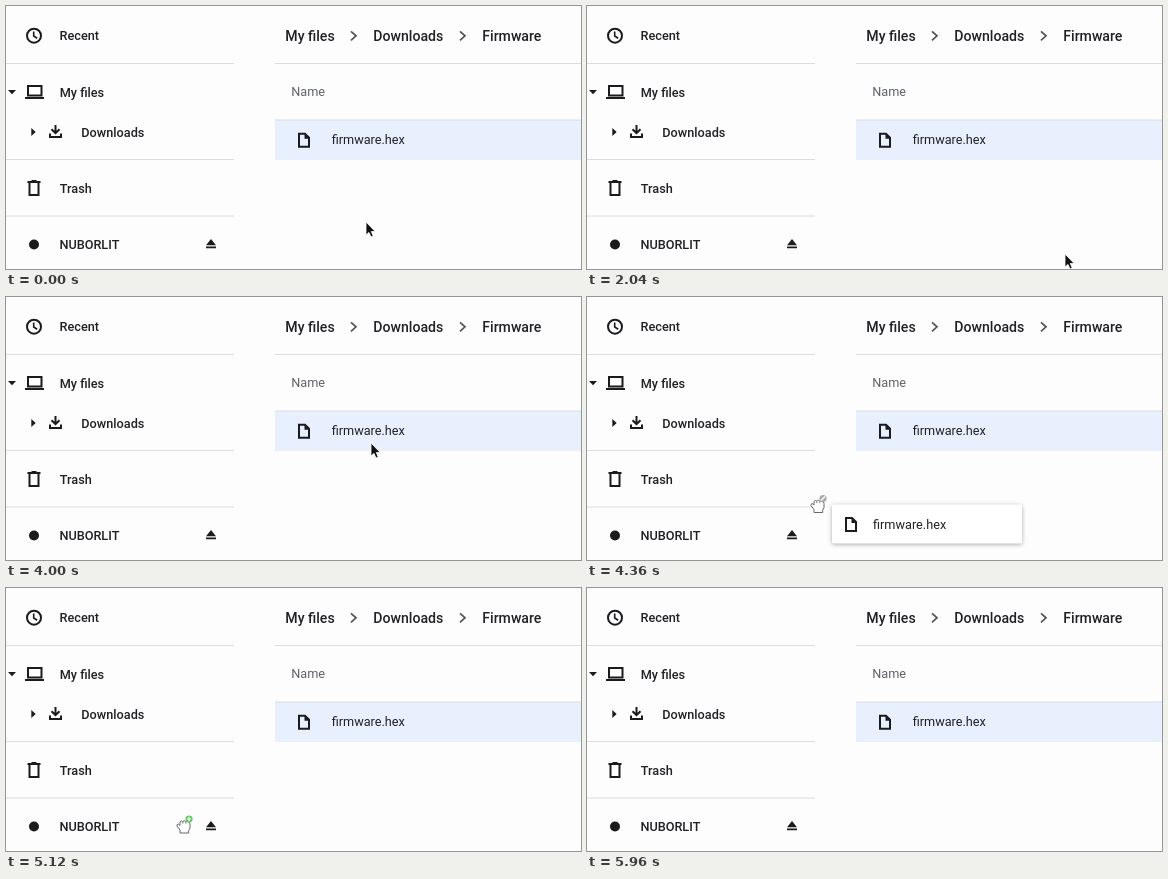
These frames come from a looping animation (575 by 263 pixels, 7000 ms). An HTML page:

```html
<!DOCTYPE html>
<html lang="en">
<head>
<meta charset="utf-8">
<title>Copying a file to a drive</title>
<style>
  html, body { margin: 0; width: 100%; height: 100%; overflow: hidden; background: #fdfdfe; }
  svg { display: block; width: 575px; height: 263px; }
  text { font: 500 12.7px Roboto, sans-serif; fill: #202124; }
  .crumb { font-size: 14.1px; }
  .plain { font-weight: 400; }
  .line { stroke: #dadce0; fill: none; }
  .icon { stroke: #1b1b1e; stroke-width: 2; fill: none; }
  .solid { fill: #1b1b1e; }
  #card rect { fill: #fff; filter: drop-shadow(0 1px 2px #0005); }
</style>
</head>
<body>
<svg viewBox="0 0 575 263">
  <defs>
    <g id="file">
      <path class="icon" d="M1 1H7L11 5V14H1Z"/>
      <path class="solid" d="M6.5 1V6H11.5Z"/>
    </g>
    <path id="chevron" class="icon" style="stroke:#505357;stroke-width:1.7" d="M-2.5-4.5 2.5 0-2.5 4.5"/>
  </defs>

  <rect id="hover" y="223" width="228" height="32" fill="#f1f3f4"/>
  <rect x="269" y="114" width="306" height="40" fill="#e8f0fe"/>
  <path class="line" d="M0 57.5H228M0 153.5H228M0 210H228M269 57.5H575M269 114H575"/>

  <!-- sidebar -->
  <circle class="icon" cx="28" cy="29.7" r="7"/>
  <path class="icon" style="stroke-width:1.6" d="M27.7 25.5V30L31.2 32.2"/>
  <text x="53.6" y="34.2">Recent</text>

  <path class="solid" d="M2 84H10L6 88.2Z"/>
  <path class="icon" d="M22 89.5V80H35.5V89.5ZM19 92H38"/>
  <text x="53.7" y="90.8">My files</text>

  <path class="solid" d="M25.3 122V130L29.7 126Z"/>
  <path class="icon" d="M49.5 119V127M45.5 123.2 49.5 127.2 53.5 123.2M44 127.5V131H55V127.5"/>
  <text x="75.3" y="130.5">Downloads</text>

  <path class="icon" d="M23.5 177V189H32.5V177M21.5 176H34.5M25.5 175H30.5"/>
  <text x="53.7" y="187">Trash</text>

  <circle class="solid" cx="28" cy="238.5" r="5"/>
  <text x="53.4" y="243">NUBORLIT</text>
  <path class="solid" d="M200 239.3 205 233 210 239.3ZM200 240.4H210V242.2H200Z"/>

  <!-- file list -->
  <text class="crumb" x="279.3" y="34.5">My files</text>
  <use href="#chevron" x="347.5" y="29.8"/>
  <text class="crumb" x="367.3" y="34.5">Downloads</text>
  <use href="#chevron" x="456.5" y="29.8"/>
  <text class="crumb" x="476.3" y="34.5">Firmware</text>
  <text class="plain" x="285.2" y="90" style="fill:#5f6368">Name</text>
  <use href="#file" x="292" y="126.7"/>
  <text class="plain" x="325.7" y="138.2">firmware.hex</text>

  <g id="card">
    <rect width="190" height="39" rx="2"/>
    <use href="#file" x="13" y="12.5"/>
    <text class="plain" x="41" y="24">firmware.hex</text>
  </g>

  <path id="arrow" d="M0 0V13L3 10.4 5 15 7.2 14 5.3 9.5H9.2Z" fill="#111" stroke="#fff" stroke-width=".8"/>
  <g id="hand">
    <path d="M-4 8V5L-7 1Q-7.5-1-5.5-.8L-4 .5V-3Q-2.8-5-1.2-3.4Q.3-5.2 1.8-3.4Q3.3-4.6 4.5-2.8Q6-3 6-1V3L4.7 5.5V8Z"
      fill="#fff" stroke="#666"/>
    <path d="M-1.2-3V-1.4M1.8-3V-1.4" stroke="#777" fill="none"/>
    <circle id="badge" cx="5" cy="-6" r="3.6"/>
    <path id="sign" stroke="#fff" stroke-width="1.2"/>
  </g>
</svg>
<script>
  const $ = id => document.getElementById(id);
  const LOOP = 7000, STEP = 40;
  const GRAB = 4120, OVER_DRIVE = 4600, DROP = 5000, LEAVE = 5520;

  // Pointer moves; y 270 is below the stage
  const moves = [
    { at: 40, time: 80, to: [445, 270] },
    { at: 2000, time: 40, to: [478, 248] },
    { at: 2040, time: 720, to: [387, 156] },
    { at: 3280, time: 440, to: [380, 137] },
    { at: 3960, time: 40, to: [365, 146] },
    { at: 4080, time: 640, to: [169, 236] },
    { at: 4920, time: 200, to: [178, 237] },
    { at: 5480, time: 480, to: [300, 270] }
  ];

  const easeOut = u => 1 - (1 - u) ** 2;

  function pointerAt(t) {
    let point = [360, 216];
    for (const { at, time, to } of moves) {
      if (t < at) break;
      const k = easeOut(Math.min(1, (t - at) / time));
      point = point.map((v, i) => v + (to[i] - v) * k);
    }
    return point;
  }

  const show = (id, on) => $(id).style.display = on ? "" : "none";
  const place = (id, x, y) => $(id).setAttribute("transform", `translate(${x} ${y})`);

  function draw() {
    const t = Math.floor((performance.now() - start) % LOOP / STEP) * STEP;
    const [x, y] = pointerAt(t);
    const holding = t >= GRAB && t < LEAVE;
    const dragging = holding && t < DROP;
    const canDrop = t >= OVER_DRIVE;

    show("arrow", !holding);
    show("hand", holding);
    show("card", dragging);
    show("hover", dragging && canDrop);
    place("arrow", x, y);
    place("hand", x, y);
    place("card", x + 14, y);

    $("badge").setAttribute("fill", canDrop ? "#5fc95f" : "#aaa");
    $("sign").setAttribute("d", canDrop ? "M2.8-6H7.2M5-8.2V-3.8" : "M3-4 7-8");
    requestAnimationFrame(draw);
  }

  const start = performance.now();
  draw();
</script>
</body>
</html>
```
